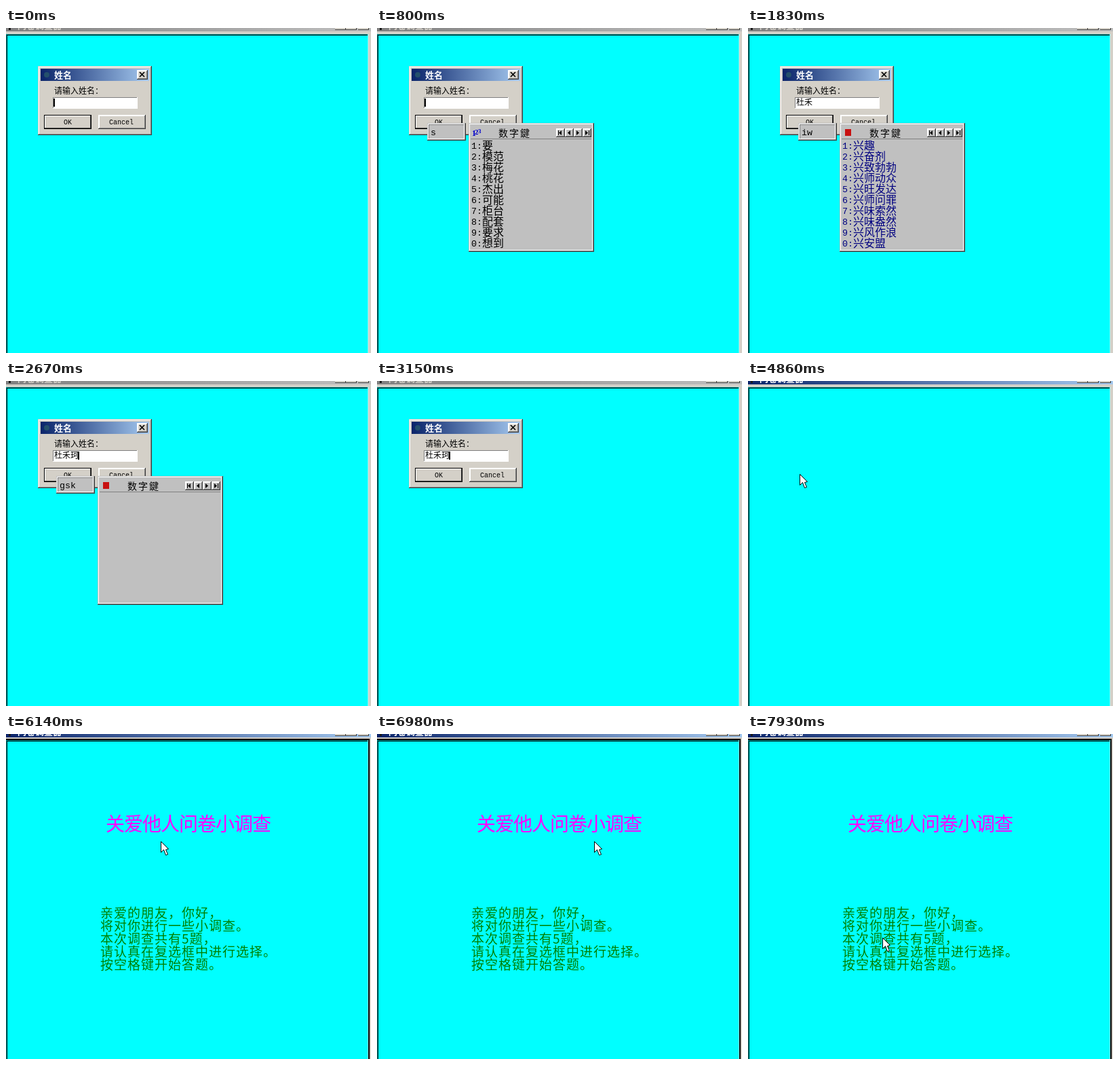
Animation of 538 by 479 pixels, one loop 7.99 s. Source, as an HTML page with a canvas:

```html
<!DOCTYPE html>
<html lang="zh-CN">
<head>
<meta charset="utf-8">
<title>问卷小调查</title>
<style>
html, body { margin: 0; width: 100%; height: 100%; overflow: hidden; background: #0ff; }
canvas { display: block; }
</style>
</head>
<body>
<canvas id="stage" width="538" height="479"></canvas>
<script>
const g = document.getElementById('stage').getContext('2d');
const LOOP = 7990;
const CJK = '"Noto Sans CJK SC", "Noto Sans CJK", sans-serif';
const MONO = '"Liberation Mono", monospace';
const FACE = '#d4d0c8', PANEL = '#c0c0c0', DARK = '#404040', GREY = '#808080';

// Input steps: time, typed code, words, is a follow-up list, entered name
const steps = [
  [0, '', '', 0, ''],
  [800, 's', '要 模范 梅花 桃花 杰出 可能 柜台 配套 要求 想到', 0, ''],
  [920, 'sf', '杜 村庄 杜绝 林场 木材', 0, ''],
  [1040, 'sf', '杜鹃 杜绝 杜撰 杜仲 杜鹃花 杜门谢客 杜渐防微', 1, '杜'],
  [1530, 'i', '不 小型 水平 学习 没有 消息 法律 治理 满意 注意', 0, '杜'],
  [1650, 'iw', '兴 兴趣 洽谈 流传 兴奋', 0, '杜'],
  [1770, 'iw', '兴趣 兴奋剂 兴致勃勃 兴师动众 兴旺发达 兴师问罪 兴味索然 兴味盎然 兴风作浪 兴安盟', 1, '杜禾'],
  [2010, 'g', '一 现在 王国 理论 事业 环境 下面 天空 开始 一个', 0, '杜禾'],
  [2070, 'gs', '下 酣畅 一桩 理想 一概 三极管 不可同日而语', 0, '杜禾'],
  [2240, 'gsk', '珂 奇特 下列 下边', 0, '杜禾'],
  [2670, 'gsk', '', 1, '杜禾珂'],
  [3150, '', '', 0, '杜禾珂']
];
const caretOn = [[0, 60], [370, 1040], [1220, 1830], [2130, 2790], [2970, 3580], [3890, 4500]];

// Pointer moves: start, step count, then [share, x, y] stops
const moves = [
  [4320, 6, [[0, 176, 182], [.6, 108, 149], [1, 76, 137]]],
  [5350, 5, [[0, 76, 137], [.5, 112, 158], [1, 154, 173]]],
  [5960, 14, [[0, 154, 173], [.286, 228, 158], [.7, 308, 142], [1, 345, 136]]],
  [6800, 14, [[0, 345, 136], [.14, 356, 135], [.36, 302, 170], [.65, 206, 237], [.8, 194, 258], [1, 229, 277]]],
  [7630, 5, [[0, 229, 277], [.5, 214, 290], [1, 198, 300]]]
];

function box(x, y, w, h, c) {
  g.fillStyle = c;
  g.fillRect(x, y, w, h);
}

function edge(x, y, w, h, light, dark) {
  box(x, y, w, 1, light);
  box(x, y, 1, h, light);
  box(x, y + h - 1, w, 1, dark);
  box(x + w - 1, y, 1, h, dark);
}

function raised(x, y, w, h, face, outer = face) {
  box(x, y, w, h, face);
  edge(x, y, w, h, outer, DARK);
  edge(x + 1, y + 1, w - 2, h - 2, '#fff', GREY);
}

function text(s, x, cy, size, color, weight = 400, family = CJK, gap = 0) {
  g.font = `${weight} ${size}px ${family}`;
  g.letterSpacing = gap + 'px';
  g.fillStyle = color;
  g.fillText(s, x, Math.round(cy + size * .37));
}

function blend(x, w, a, b) {
  const grad = g.createLinearGradient(x, 0, x + w, 0);
  grad.addColorStop(0, a);
  grad.addColorStop(1, b);
  return grad;
}

function poly(points, fill) {
  g.beginPath();
  points.forEach(([x, y]) => g.lineTo(x, y));
  g.closePath();
  g.fillStyle = fill;
  g.fill();
}

function mainWindow(active, focused) {
  box(0, 0, 538, 479, FACE);
  box(0, 0, 538, 5, active ? blend(0, 538, '#0a246a', '#a6caf0') : blend(0, 538, GREY, PANEL));
  box(4, 0, 3, 3, '#181818');
  text('问卷调查器', 17, -4, 13, active ? '#fff' : FACE, 700);
  for (const x of [485, 501, 519]) {
    box(x, 0, 16, 3, FACE);
    box(x, 2, 16, 1, DARK);
    box(x + 15, 0, 1, 3, DARK);
  }
  if (focused) box(0, 7, 536, 472, '#000');
  // Sunken canvas border in shades of its own cyan
  box(0, 9, 534, 470, '#099');
  box(1, 10, 532, 469, '#000');
  box(2, 11, 531, 468, '#0ff');
  box(533, 9, 1, 470, '#7fffff');
}

function button(label, x, tx, main, down) {
  raised(x, 128, 70, 21, FACE, '#fff');
  if (main) {
    edge(x, 128, 70, 21, '#000', '#000');
    edge(x + 1, 129, 68, 19, down ? GREY : '#fff', down ? '#fff' : DARK);
  }
  const d = down ? 1 : 0;
  text(label, tx + d, 138 + d, 10, '#000', 400, MONO);
}

function dialog(name, caret, down) {
  raised(47, 56, 168, 102, FACE);
  box(51, 60, 160, 18, blend(51, 160, '#0a246a', '#a6caf0'));
  g.beginPath();
  g.arc(60, 69, 4, 0, 7);
  g.fillStyle = '#24506c';
  g.fill();
  text('姓名', 71, 69, 13, '#fff', 700);
  raised(193, 62, 16, 14, FACE, '#fff');
  g.strokeStyle = '#000';
  g.lineWidth = 1.6;
  g.beginPath();
  g.moveTo(197, 65); g.lineTo(204, 72);
  g.moveTo(204, 65); g.lineTo(197, 72);
  g.stroke();
  text('请输入姓名：', 71, 93, 12, '#000');
  box(69, 102, 125, 17, '#fff');
  edge(69, 102, 125, 17, GREY, '#fff');
  text(name, 71, 110, 12, '#000');
  if (caret) box(70 + name.length * 12, 104, 2, 12, '#000');
  button('OK', 56, 85, true, down);
  button('Cancel', 136, 152, false, false);
}

function arrows() {
  for (let i = 0; i < 4; i++) {
    const x = 264 + i * 13, right = i > 1, s = right ? 1 : -1, m = x + 6;
    raised(x, 148, 13, 13, PANEL, '#fff');
    poly([[m - 2 * s, 151], [m - 2 * s, 158], [m + 2 * s, 154.5]], '#000');
    if (i === 0) box(x + 3, 151, 1, 7, '#000');
    if (i === 3) box(x + 9, 151, 1, 7, '#000');
  }
}

function wordPanel(code, words, follow) {
  raised(74, 140, 57, 26, PANEL);
  edge(76, 142, 53, 22, GREY, '#fff');
  text(code, 79, 153, 13.33, '#000', 400, MONO);

  raised(135, 140, 185, 190, PANEL);
  edge(137, 142, 181, 186, PANEL, '#fff');
  box(138, 163, 178, 1, GREY);
  if (follow) {
    box(143, 149, 9, 10, '#c81010');
  } else {
    text('1', 140, 155, 12, '#00c', 700, '"Liberation Serif", serif');
    text('2', 144, 153, 11, '#00c', 700, '"Liberation Serif", serif');
    text('3', 149, 152, 9, '#00c', 700, '"Liberation Serif", serif');
  }
  text('数字鍵', 179, 155, 14, '#000', 400, CJK, 2);
  arrows();
  const color = follow ? '#000080' : '#000';
  words.split(' ').filter(Boolean).forEach((word, i) => {
    const y = 173 + i * 16;
    text((i + 1) % 10 + ':', 139, y, 13.33, color, 400, MONO);
    text(word, 155, y, 16, color, 300);
  });
}

function welcome() {
  text('关爱他人问卷小调查', 147, 133, 28, '#f0f', 400, CJK, -1);
  ['亲爱的朋友，你好，', '将对你进行一些小调查。', '本次调查共有5题，', '请认真在复选框中进行选择。', '按空格键开始答题。']
    .forEach((line, i) => text(line, 139, 264 + i * 19, 19, '#008000', 300, CJK, 1));
}

function pointer(t) {
  const move = moves.filter(m => t >= m[0]).pop();
  if (!move) return;
  const [start, count, stops] = move;
  const u = Math.min(1, (Math.floor((t - start) / 59) + 1) / count);
  const i = Math.max(1, stops.findIndex(s => s[0] >= u));
  const a = stops[i - 1], b = stops[i], k = (u - a[0]) / (b[0] - a[0]);
  g.save();
  g.translate(Math.round(a[1] + (b[1] - a[1]) * k) + .5, Math.round(a[2] + (b[2] - a[2]) * k) + .5);
  poly([[0, 0], [0, 16], [4, 12], [7, 20], [10, 19], [7, 12], [11, 11]], '#fff');
  g.strokeStyle = '#000';
  g.lineWidth = 1;
  g.stroke();
  g.restore();
}

function draw(t) {
  const open = t < 4800;
  mainWindow(!open, t >= 4920);
  if (open) {
    const [, code, words, follow, name] = steps.filter(s => t >= s[0]).pop();
    const caret = caretOn.some(([a, b]) => t >= a && t < b);
    dialog(name, caret, t >= 4680 && t < 4740);
    if (code) wordPanel(code, words, follow);
  } else if (t >= 4920) {
    welcome();
  }
  pointer(t);
}

const begin = performance.now();
function tick() {
  draw((performance.now() - begin) % LOOP);
  requestAnimationFrame(tick);
}
tick();
</script>
</body>
</html>
```
